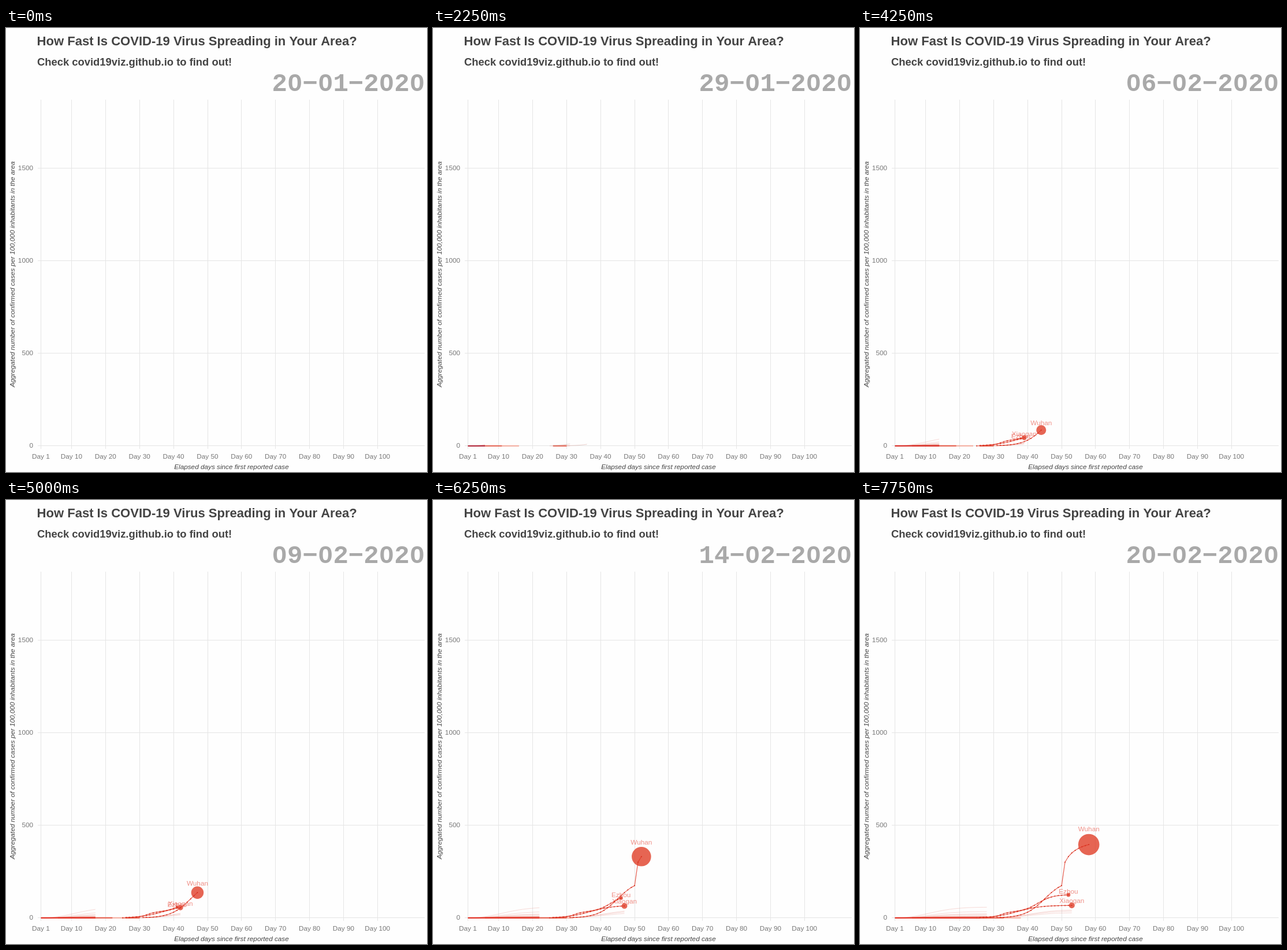
An HTML page with a canvas for the animation above (8000 ms loop, 729 by 768 pixels).

```html
<!DOCTYPE html>
<html lang="en">
<head>
<meta charset="utf-8">
<title>COVID-19 spread by area</title>
<style>
  html, body { margin: 0; height: 100%; overflow: hidden; background: #fefefe; }
  canvas { display: block; }
</style>
</head>
<body>
<canvas id="chart" width="729" height="768"></canvas>
<script>
const ctx = document.getElementById('chart').getContext('2d');
const SANS = '"Liberation Sans", Arial, sans-serif';
const MONO = '"Liberation Mono", "Courier New", monospace';
const SMALL = '11.76px ' + SANS;
const STEP_MS = 250, STEPS = 32, FIRST_STEP = 4, THRESHOLD = 30;

const dayX = day => 54.75 + 5.887 * day;
const caseY = cases => 722.85 - 0.3205 * cases;

// Saturating growth from 0 to 1
const growth = (age, scale, power) => 1 - Math.exp(-((age / scale) ** power));

// Logistic curve of cases by elapsed day
const logistic = (day, top, middle, spread) => top / (1 + Math.exp((middle - day) / spread));

// lag is the elapsed day minus the step; Wuhan jumps when its way of counting changes on day 51
const cities = [
  { name: 'Xiaogan', lag: 22, size: 1.09, cases: day => logistic(day, 68, 37, 3.4) },
  { name: 'Ezhou', lag: 21, size: 0.55,
    cases: day => logistic(day, 32, 32, 1.3) + logistic(day, 94, 43, 2.2) },
  { name: 'Wuhan', lag: 27, size: 1.63,
    cases: day => day < 51 ? logistic(day, 205, 45, 2.9) : 301 + 115 * growth(day - 51, 3.8, 0.9) }
];

// Unlabelled areas: two groups that level off at different heights
const areas = [
  ...[58, 34, 21, 20].map(top => ({ lag: -3, top, scale: 13, power: 2.2 })),
  ...[43, 37, 28].map(top => ({ lag: 22, top, scale: 17, power: 3 }))
];
for (let k = 0; k < 14; k++)
  areas.push({ lag: -3, top: 1 + 12 * (k / 14) ** 2, scale: 10 + k % 5, power: 2 });

function text(str, x, y, font, color, align = 'left') {
  ctx.font = font;
  ctx.fillStyle = color;
  ctx.textAlign = align;
  ctx.fillText(str, x, y);
}

function polyline(points, color, width) {
  ctx.beginPath();
  points.forEach(([x, y]) => ctx.lineTo(x, y));
  ctx.strokeStyle = color;
  ctx.lineWidth = width;
  ctx.stroke();
}

function disc(x, y, r, color) {
  ctx.beginPath();
  ctx.arc(x, y, r, 0, 7);
  ctx.fillStyle = color;
  ctx.fill();
}

function gridLine(x, y, w, h) {
  ctx.fillStyle = '#e5e5e5';
  ctx.fillRect(Math.floor(x), Math.floor(y), w, h);
}

// Points of a curve from the first reported step to the current one
function trace(step, lag, cases) {
  const points = [];
  for (let s = FIRST_STEP; s <= step; s++)
    points.push([dayX(s + lag), caseY(cases(s + lag))]);
  return points;
}

function drawFrame(step) {
  ctx.fillStyle = '#fefefe';
  ctx.fillRect(0, 0, 729, 768);

  for (let tick = 0; tick <= 100; tick += 10) {
    const day = tick || 1;
    gridLine(dayX(day), 124, 1, 604);
    text('Day ' + day, dayX(day) - 0.2, 745, SMALL, '#777', 'center');
  }
  for (let cases = 0; cases <= 1500; cases += 500) {
    gridLine(55, caseY(cases), 670, 1);
    text(cases, 47, Math.floor(caseY(cases)) + 4, SMALL, '#777', 'right');
  }

  text('How Fast Is COVID-19 Virus Spreading in Your Area?', 53.5, 30.3, 'bold 22.05px ' + SANS, '#444');
  text('Check covid19viz.github.io to find out!', 54, 65, 'bold 18.4px ' + SANS, '#444');
  text('Elapsed days since first reported case', 390.5, 763, 'italic ' + SMALL, '#444', 'center');
  ctx.save();
  ctx.translate(15, 426);
  ctx.rotate(-Math.PI / 2);
  text('Aggregated number of confirmed cases per 100,000 inhabitants in the area',
    0, 0, 'italic ' + SMALL, '#444', 'center');
  ctx.restore();

  drawDate(step);
  if (step >= FIRST_STEP) drawData(step);
}

function drawDate(step) {
  const [year, month, day] = new Date(Date.UTC(2020, 0, 20 + step)).toISOString().slice(0, 10).split('-');
  [...`${day}\u2212${month}\u2212${year}`].forEach((char, k) => {
    const x = 473.8 + 26.46 * k;
    text(char, x, 109, 'bold 44.1px ' + MONO, '#a9a9a9', 'center');
    if (char !== '0') return;
    // plain zero: clear the centre dot
    ctx.beginPath();
    ctx.ellipse(x, 94.5, 4, 6, 0, 0, 7);
    ctx.fillStyle = '#fefefe';
    ctx.fill();
  });
}

function drawData(step) {
  for (const { lag, top, scale, power } of areas) {
    const start = FIRST_STEP + lag;
    polyline(trace(step, lag, day => top * growth(day - start, scale, power)), 'rgba(222,110,95,.25)', 1);
  }

  // Many areas overlap close to zero
  const mix = Math.min(1, Math.max(0, (step - 9) / 10));
  const bars = [
    [11, step + 7, '#f3aa9c'],
    [6, step + 2, '#e4604f'],
    [1, step - 3, `rgb(${175 + 51 * mix},${35 + 5 * mix},${55 - 28 * mix})`],
    [26, Math.min(step + 22, 30), '#e4604f']
  ];
  for (const [from, to, color] of bars)
    polyline([[dayX(from), caseY(0)], [dayX(to), caseY(0)]], color, 2);

  for (const { name, lag, size, cases } of cities) {
    const points = trace(step, lag, cases);
    if (cases(step + lag) < THRESHOLD) {
      polyline(points, 'rgba(205,140,130,.4)', 1);
      continue;
    }
    const [x, y] = points.at(-1);
    const r = size * Math.sqrt(caseY(0) - y);
    disc(x, y, r, 'rgba(223,55,32,.77)');
    polyline(points, 'rgba(224,55,38,.8)', 1.2);
    points.forEach(([px, py]) => disc(px, py, 1, '#d6301f'));
    text(name, x, y - 1.4 * r + 3, SMALL, 'rgba(230,70,55,.6)', 'center');
  }
}

function tick() {
  drawFrame(Math.floor(performance.now() / STEP_MS) % STEPS);
  requestAnimationFrame(tick);
}
tick();
</script>
</body>
</html>
```
